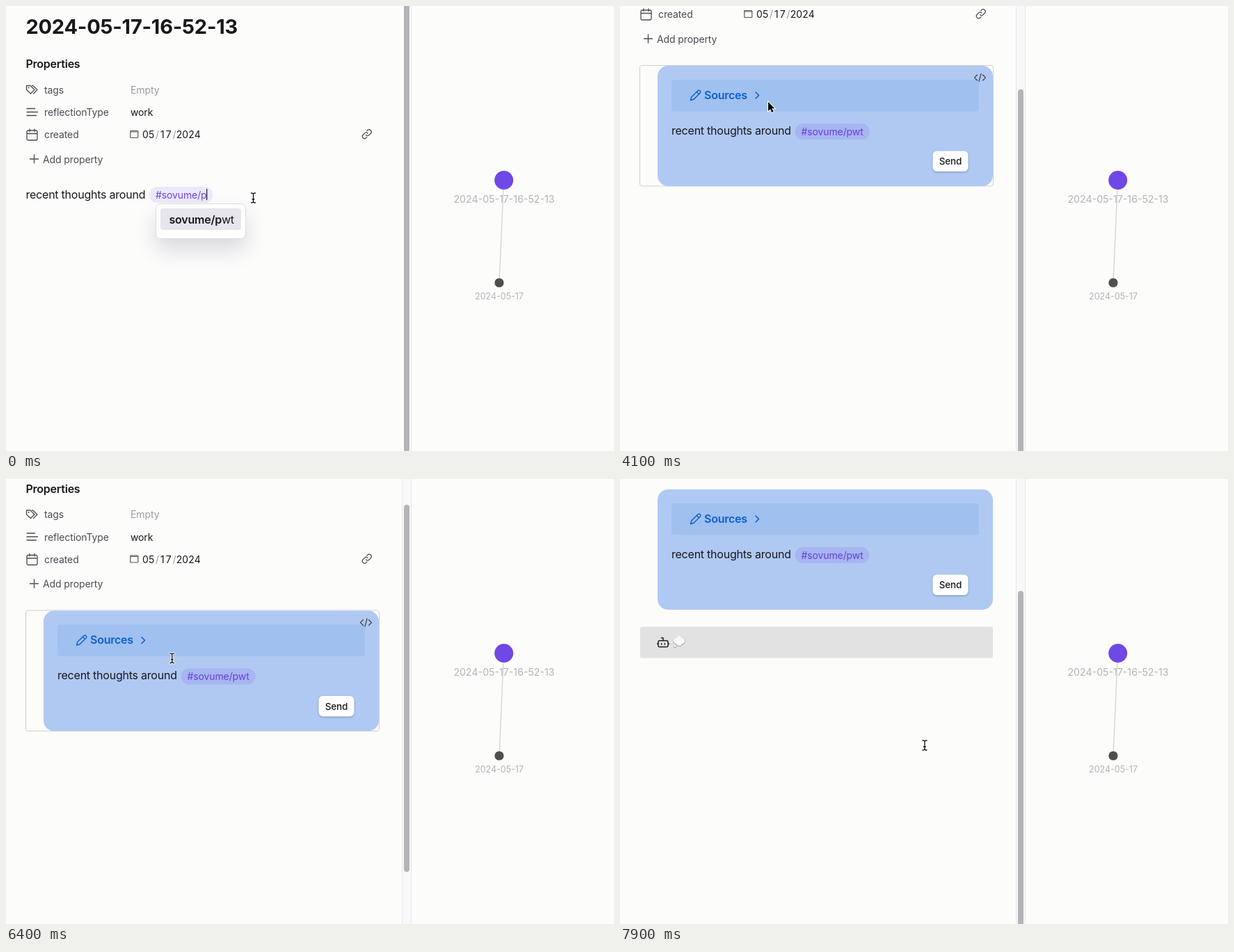
Animation, 874 px wide and 640 px high, one loop 8000 ms. Source, as an HTML page with a canvas:

```html
<!DOCTYPE html>
<html lang="en">
<head>
<meta charset="utf-8">
<title>Note with sources</title>
<style>
html, body { margin: 0; width: 100%; height: 100%; overflow: hidden; background: #fcfcfb; }
canvas { display: block; }
</style>
</head>
<body>
<canvas id="stage" width="874" height="640"></canvas>
<script>
const ctx = document.getElementById('stage').getContext('2d');
const LOOP = 8000, STEP = 100;
const INK = '#18181a', MUTED = '#4c4c50', FAINT = '#9c9c9e';
const PURPLE = '#6f45df', LINK = '#5738d8', BLUE = '#0b5fd0';
const TAG = '#sovume/pwt';

// Times of the main events
const PICK = 900, CARD = 3000, OPEN = 4200, CLOSE = 6000, SENT = 7300;
const CARD_Y = 259, EXTRA = 341.5;

// The page jumps to its end when a block is added; between that it is scrolled by hand
const SCROLL = [[CARD - 1, 0], [CARD, 173], [4300, 173], [5000, 343.5], [5150, 343.5],
  [5600, 67.5], [CLOSE - 1, 67.5], [CLOSE, 69.5], [SENT - 1, 69.5], [SENT, 244]];
const MOUSE_X = [[3600, 355], [4100, 213], [4300, 190], [5050, 208], [5600, 211],
  [5900, 188], [6200, 188], [6900, 444], [7100, 470], [7300, 470], [7800, 438]];
const MOUSE_Y = [[3600, 276], [4100, 138], [4300, 130], [5050, 84], [5600, 67],
  [5900, 234], [6200, 234], [6900, 353], [7100, 330], [7300, 330], [7800, 383]];

function along(keys, t) {
  if (t <= keys[0][0]) return keys[0][1];
  for (let i = 1; i < keys.length; i++) {
    const [t0, a] = keys[i - 1], [t1, b] = keys[i];
    if (t <= t1) {
      const k = (t - t0) / (t1 - t0);
      return a + (b - a) * k * k * (3 - 2 * k);
    }
  }
  return keys[keys.length - 1][1];
}

// y is the middle of the capitals; returns the drawn width
function text(s, x, y, size = 16, color = INK, weight = 400, align = 'left', track) {
  if (track === undefined) track = size >= 16 ? -0.0145 : -0.008;
  ctx.font = `${weight} ${size}px Inter, sans-serif`;
  ctx.letterSpacing = `${track * size}px`;
  ctx.textAlign = align;
  ctx.fillStyle = color;
  ctx.fillText(s, x, y + size * 0.36);
  return ctx.measureText(s).width;
}

function box(x, y, w, h, r, fill, stroke) {
  ctx.beginPath();
  ctx.roundRect(x, y, w, h, r);
  if (fill) { ctx.fillStyle = fill; ctx.fill(); }
  if (stroke) { ctx.strokeStyle = stroke; ctx.lineWidth = 1; ctx.stroke(); }
}

function disc(x, y, r, fill) {
  ctx.beginPath();
  ctx.arc(x, y, r, 0, Math.PI * 2);
  ctx.fillStyle = fill;
  ctx.fill();
}

function icon(d, x, y, color = MUTED, width = 1.3) {
  ctx.save();
  ctx.translate(x, y);
  ctx.strokeStyle = color;
  ctx.lineWidth = width;
  ctx.lineCap = ctx.lineJoin = 'round';
  ctx.stroke(new Path2D(d));
  ctx.restore();
}

function shadowed(color, blur, dy, draw) {
  ctx.save();
  ctx.shadowColor = color;
  ctx.shadowBlur = blur;
  ctx.shadowOffsetY = dy;
  draw();
  ctx.restore();
}

function digits(s, x, y) {
  [...s].forEach((c, i) => text(c, x + 4.4 + i * 8.75, y, 14, INK, 400, 'center', 0));
}

function pill(s, x, y, onCard) {
  ctx.font = '400 14px Inter, sans-serif';
  ctx.letterSpacing = `${-0.008 * 14}px`;
  const w = ctx.measureText(s).width;
  box(x - 9, y - 11.5, w + 18, 23, 11.5, onCard ? '#a6b6f0' : '#eee8fc');
  text(s, x, y, 14, onCard ? '#6a3ce4' : PURPLE);
  return w;
}

function header() {
  text('2024-05-17-16-52-13', 28.5, 30, 29, INK, 700, 'left', -0.008);
  text('Properties', 28.5, 83.5, 16, INK, 600);

  icon('M.5 .5H6L12 6.5L6.5 12L.5 6.5Z M8.5 .5H9.5L16 6.5L10.5 12', 29, 114);
  disc(32.6, 117.4, 1, MUTED);
  text('tags', 55, 120.5, 14, MUTED);
  text('Empty', 179, 120.5, 14, FAINT);

  icon('M.5 0H12 M.5 5H16 M.5 10H14', 29.5, 147.5);
  text('reflectionType', 55, 153, 14, MUTED);
  text('work', 179, 153, 14);

  icon('M2 2H13Q15 2 15 4V14Q15 16 13 16H2Q0 16 0 14V4Q0 2 2 2Z M0 6.5H15 M4 0V3.5 M11 0V3.5', 30, 177);
  text('created', 55, 185, 14, MUTED);
  icon('M1 0H10Q11 0 11 1V9Q11 10 10 10H1Q0 10 0 9V1Q0 0 1 0Z M0 1.5H11', 178.8, 179.5, '#555', 1.2);
  digits('05', 196, 185);
  text('/', 215, 185, 14, FAINT);
  digits('17', 220.5, 185);
  text('/', 239.5, 185, 14, FAINT);
  digits('2024', 244.5, 185);
  icon('M5.5 8A3.2 3.2 0 0 0 10 8L12.5 5.5A3.2 3.2 0 0 0 8 1L6.7 2.3 M8 5.5A3.2 3.2 0 0 0 3.5 5.5L1 8A3.2 3.2 0 0 0 5.5 12.5L6.8 11.2', 512, 177.5, MUTED, 1.2);

  icon('M6 0V12 M0 6H12', 34.5, 214);
  text('Add property', 53, 220.5, 14, MUTED);
}

function typing(t) {
  text('recent thoughts around', 28.5, 271);
  const typed = TAG.slice(0, t < 300 ? 9 : t < 500 ? 10 : 11);
  const w = pill(typed, 215, 271.5);
  if (t < PICK) {
    ctx.fillStyle = INK;
    ctx.fillRect(215 + w - 0.5, 263, 1.2, 16);
    popup(typed.slice(1));
    return;
  }
  const p = ctx.measureText(TAG.slice(0, 8)).width;
  ctx.setLineDash([2, 1.5]);
  ctx.beginPath();
  ctx.moveTo(215 + p, 279);
  ctx.lineTo(215 + w, 279);
  ctx.strokeStyle = '#a0407c';
  ctx.lineWidth = 1.4;
  ctx.stroke();
  ctx.setLineDash([]);
  const tail = t < 1600 ? '' : t < 2100 ? '<' : '<4';
  const tw = text(tail, 314.5, 271);
  if (t < 2500 && Math.floor(t / 500) % 2 === 0) {
    ctx.fillStyle = INK;
    ctx.fillRect(315 + tw, 262, 1.2, 18);
  }
}

function popup(match) {
  shadowed('rgba(40,30,90,.16)', 30, 16, () => box(215.5, 284.5, 129, 50, 7, '#fff'));
  box(215.5, 284.5, 129, 50, 7, '#fff', '#dddde1');
  box(222, 291, 116, 31, 4, '#e6e5eb');
  const w = text(match, 234.5, 307, 16, INK, 600);
  text(TAG.slice(1 + match.length), 234.5 + w, 307);
}

function link(s, x, y) {
  const w = text(s, x, y, 16, LINK);
  ctx.fillRect(x, Math.round(y + 8), w, 1);
}

function sources(y) {
  const w = text('Strategy', 99, y + 81, 16, INK, 700);
  text(': Extract content snippets from a file that', 99 + w, y + 81);
  text('reference a specific evergreen note or tag.', 99, y + 106);
  [163.5, 215.5, 267, 293.5].forEach(dy => disc(121.5, y + dy + 0.5, 3, '#7089b4'));
  link('Velmar CEO Dorin Kep on Shaping Buyer-Demand', 135.5, y + 163.5);
  link('Pull via Talks by OVN4 by Ostrevil Highlights', 135.5, y + 189);
  link('Purpose, Plans & Beliefs — 2018 Recap by', 135.5, y + 215.5);
  link('Torvo.Meadow Highlights', 135.5, y + 240);
  link('2024-05-12-11-27-45', 135.5, y + 267);
  link('sovume lab wk3 overview diagram', 135.5, y + 293.5);
  text('Extracting contents around mentions of:', 99, y + 351);
  pill(TAG, 108, y + 371.5, true);
}

function card(open, hover) {
  const y = CARD_Y, add = open ? EXTRA : 0;
  if (hover) box(28.5, y - 0.5, 508, 173.5 + add, 3, null, '#cfcfd3');
  box(54, y, 482, 173 + add, 15, '#b0c9f3');
  box(74, y + 20, 442, 45.5 + add, 4, '#a0c0f0');

  icon('M1 15L2.2 10.5L11.5 1.2Q13 0 14.6 1.5Q16 3 14.8 4.5L5.5 13.8Z M9.8 3L13 6.2', 100.5, y + 34.5, BLUE, 1.4);
  text('Sources', 121, y + 42, 16, BLUE, 600);
  if (open) icon('M0 0L4.5 4.5L9 0', 193, y + 41, BLUE, 1.5);
  else icon('M0 0L4.5 4.5L0 9', 195, y + 38, BLUE, 1.5);
  if (hover) icon('M4 0L0 4L4 8 M12 0L16 4L12 8 M9.5 -1.5L6.5 9.5', 509.5, y + 13, '#45454a');

  if (open) sources(y);
  text('recent thoughts around', 74, y + 93 + add);
  pill(TAG, 260.5, y + 94.5 + add, true);
  shadowed('rgba(30,40,80,.35)', 3, 1, () => box(449.5, y + 122.5 + add, 51, 29.5, 6, '#fff'));
  text('Send', 475, y + 137.5 + add, 13.5, INK, 500, 'center');
}

function reply() {
  box(29, 456.5, 507, 45, 3, '#e2e2e2');
  icon('M2 4H12Q14 4 14 6V11Q14 13 12 13H2Q0 13 0 11V6Q0 4 2 4Z M7 4V0H4.5 M-1 8V9 M15 8V9 M4.7 8V9.5 M9.3 8V9.5', 55, 472.5, INK, 1.4);
  const puffs = [[81, 477, 4], [85, 474.5, 4.5], [89, 477, 4.3], [85, 479.5, 4.5], [79, 484.5, 1.5]];
  puffs.forEach(([x, y, r]) => disc(x, y + 0.4, r + 0.7, '#a8a8a8'));
  puffs.forEach(([x, y, r]) => disc(x, y - 0.2, r, '#f8f8f6'));
}

function scrollbar(t, scroll, open) {
  const VIEW = 660, TOP = -18.6;
  ctx.fillStyle = '#f8f8f9';
  if (t >= CARD) ctx.fillRect(569, 0, 13, 640);
  ctx.fillStyle = '#e8e8ea';
  ctx.fillRect(582, 0, 1, 640);
  if (t >= CARD) ctx.fillRect(569, 0, 1, 640);
  const k = t < CARD ? 1 : open ? 0.569 : t >= SENT ? 0.736 : 0.8;
  box(572, TOP + k * scroll, 8, VIEW * k, 4, '#b4b4b8');
}

function graph() {
  text('2024-05-17-16-52-13', 716, 277.5, 14.2, '#b4b4b6', 400, 'center', 0);
  text('2024-05-17', 709, 417.5, 12.5, '#b4b4b6', 400, 'center', 0);
  ctx.beginPath();
  ctx.moveTo(715.5, 250.5);
  ctx.lineTo(709, 398);
  ctx.strokeStyle = '#d0d0d2';
  ctx.lineWidth = 1.2;
  ctx.stroke();
  disc(715.7, 250.5, 13.5, '#6f48e6');
  disc(709, 398, 6.6, '#4e504e');
}

function pointer(t) {
  if (t >= 400 && t < 3600) return;
  const x = t < 400 ? 355.5 : along(MOUSE_X, t);
  const y = t < 400 ? 276 : along(MOUSE_Y, t);
  const arrow = (t >= 3900 && t < 4500) || (t >= 5800 && t < 6400) || (t >= 7000 && t < 7500);
  if (arrow) {
    const p = new Path2D('M0 0V13L3 10.2L5.2 15L7.6 14L5.4 9.3H9.3Z');
    ctx.save();
    ctx.translate(x, y);
    ctx.strokeStyle = '#fff';
    ctx.lineWidth = 2;
    ctx.stroke(p);
    ctx.fillStyle = '#000';
    ctx.fill(p);
    ctx.restore();
  } else {
    const beam = 'M-3 -7Q0 -7 0 -5Q0 -7 3 -7 M0 -5V5 M-3 7Q0 7 0 5Q0 7 3 7 M-1.5 2H1.5';
    icon(beam, x, y, '#fff', 3);
    icon(beam, x, y, '#111', 1.3);
  }
}

function draw(t) {
  const scroll = along(SCROLL, t);
  const open = t >= OPEN && t < CLOSE;
  ctx.fillStyle = '#fcfcfb';
  ctx.fillRect(0, 0, 874, 640);
  ctx.save();
  ctx.beginPath();
  ctx.rect(0, 0, 569, 640);
  ctx.clip();
  ctx.translate(0, -scroll);
  header();
  if (t < CARD) typing(t);
  else card(open, t < SENT);
  if (t >= SENT) reply();
  ctx.restore();
  scrollbar(t, scroll, open);
  graph();
  pointer(t);
}

const start = performance.now();
function tick() {
  const t = Math.max(0, performance.now() - start) % LOOP;
  draw(Math.floor(t / STEP) * STEP);
  requestAnimationFrame(tick);
}
tick();
</script>
</body>
</html>
```
